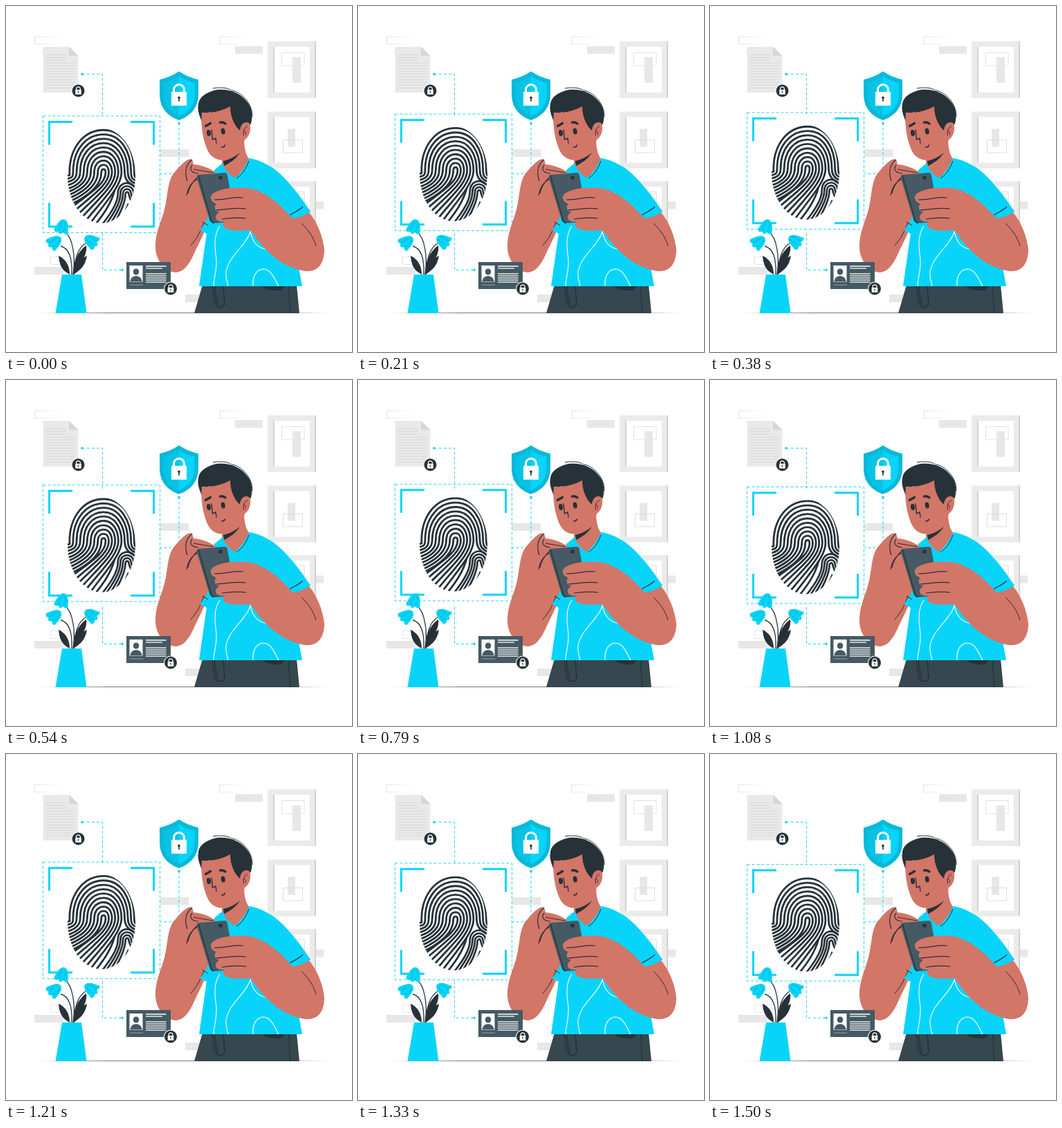
Recreate the animation shown at these times as an HTML page with a canvas. Size 500 by 500 pixels, loop 1.54 s.

```html
<!DOCTYPE html>
<html lang="en">
<head>
<meta charset="utf-8">
<title>Fingerprint access</title>
<style>
html, body { margin: 0; width: 100%; height: 100%; overflow: hidden; background: #fff; }
canvas { display: block; width: 100vw; height: 100vh; }
</style>
</head>
<body>
<canvas id="stage" width="500" height="500"></canvas>
<script>
const ctx = document.getElementById('stage').getContext('2d');
const CYAN = '#08d4fa', TEAL = '#08b9da', DARK = '#263238', SLATE = '#455a64';
const SKIN = '#d27668', PALE = '#ebebeb', GRAY = '#e7e7e7', WHITE = '#fff';

function fill(color, d) {
  ctx.fillStyle = color;
  ctx.fill(new Path2D(d));
}
function line(color, width, d, dash = []) {
  ctx.strokeStyle = color;
  ctx.lineWidth = width;
  ctx.setLineDash(dash);
  ctx.stroke(new Path2D(d));
  ctx.setLineDash([]);
}
function rect(color, x, y, w, h) {
  ctx.fillStyle = color;
  ctx.fillRect(x, y, w, h);
}
function oval(color, x, y, rx, ry = rx, turn = 0) {
  ctx.fillStyle = color;
  ctx.beginPath();
  ctx.ellipse(x, y, rx, ry, turn, 0, Math.PI * 2);
  ctx.fill();
}
function fade(x0, x1, ...stops) {
  const g = ctx.createLinearGradient(x0, 0, x1, 0);
  stops.forEach((c, i) => g.addColorStop(i / (stops.length - 1), c));
  return g;
}

function pictureFrame(y) {
  rect(PALE, 378, y, 70, 82);
  rect('#d2d2d2', 446, y, 2, 82);
  rect(WHITE, 387, y + 8, 52, 66);
  rect('#d2d2d2', 386, y + 8, 2, 66);
}

function background() {
  rect(WHITE, 0, 0, 500, 500);
  for (const x of [41.5, 308.5])
    line(fade(x, x + 40, '#e2e2e2', '#fff'), 1, `M${x} 44.5h41v10.5h-41z`);
  for (const [x, y, w] of [[331, 58, 40], [223, 207, 41], [41, 377, 42], [259, 417, 24], [446, 282.5, 13]])
    rect(GRAY, x, y, w, 11);
  line('#e6e6e6', 1, 'M64.5 362.5h25v11h-25z');

  [51, 152.5, 253].forEach(pictureFrame);
  line('#e2e2e2', 1, 'M398.5 67.5h32.5v18.5h-32.5z M402.5 268.5h29v22h-29z');
  rect(GRAY, 414, 74, 12, 37);
  rect(GRAY, 407, 177.5, 11, 26);
  line('#dcdcdc', 1, 'M400.5 193.5h28v18.5h-28z');

  line(fade(45, 467, '#fff', '#777', '#777', '#777', '#fff'), 1, 'M45 443.5H467');
}

function badge(x, y) {
  oval(WHITE, x, y, 10);
  oval(DARK, x, y, 9);
  rect(WHITE, x - 4.3, y - 1.5, 8.6, 6.8);
  line(WHITE, 1.3, `M${x - 2.9} ${y - 1}v-1.7a2.9 2.9 0 0 1 5.8 0v1.7`);
  rect(DARK, x - .6, y, 1.2, 3.2);
}

function documentSheet() {
  fill('#e9e9e9', 'M53.5 59H91L104.5 72V125H53.5z');
  fill('#d6d6d6', 'M91 59V72H104.5z');
  for (let i = 0; i < 13; i++)
    line('#d8d8d8', 1.2, `M58 ${70.5 + i * 4}H${i < 3 ? 87 : 100}`);
  badge(104.5, 122.5);
}

function idCard() {
  rect(SLATE, 174, 370, 64, 39);
  rect(WHITE, 178.5, 375, 19, 23.5);
  oval(SLATE, 188, 384, 4.3, 4.6);
  fill(SLATE, 'M179.5 398C180 387.5 196 387.5 196.5 398z');
  line(WHITE, 1.3, 'M202 376H231.5 M202 379.2H226');
  for (let y = 387; y < 400; y += 3) line(WHITE, 1.3, `M202 ${y}H231.5`);
  line('#90a4ae', 1, 'M179 403H198');
  badge(238, 408.5);
}

function shield() {
  fill(TEAL, 'M250 94.5C242 100 232 104 222 106.5V127C222 147 233 159 250 165C267 159 278 147 278 127V106.5C268 104 258 100 250 94.5z');
  fill('#08c3e6', 'M250 101C243 106 236 109 227.5 111V127C227.5 143 236 153 250 159z');
  fill(CYAN, 'M250 101C257 106 264 109 272.5 111V127C272.5 143 264 153 250 159z');
  rect(WHITE, 239, 124, 22, 20);
  line(WHITE, 3, 'M242.5 125V121A7.5 7.5 0 0 1 257.5 121V125');
  oval(DARK, 250, 132.5, 1.8);
  rect(DARK, 249.2, 133, 1.6, 5);
}

function links() {
  line(CYAN, .9, 'M110 98.5H139.5V158 M139.5 328V381.5H168 M250 169V242.5H223', [4, 3]);
  oval(CYAN, 110, 98.5, 1.8);
  oval(CYAN, 168, 381.3, 1.8);
  oval(CYAN, 250, 169.5, 1.8);
}

// Nested ridges: arches over one core, sweeping left, and splitting at a delta on the right.
function fingerprint() {
  ctx.save();
  ctx.beginPath();
  ctx.ellipse(138, 245.7, 49, 68.7, 0, 0, Math.PI * 2);
  ctx.clip();
  for (let k = 0; k < 10; k++) {
    const r = 4 + 6.3 * k, left = 141 - .81 * r, right = 141 + .73 * r, top = 240.5 - r;
    let d = `M84 ${291 - 5 * k}C${98 - k * .4} ${286 - 4.6 * k} ${left} ${268 - 2.4 * k} ${left} 241`
      + `C${left} ${240 - r * .6} ${141 - r * .45} ${top} 141 ${top}`
      + `S${right} ${240 - r * .55} ${right} 241`;
    if (k < 6) d += `C${right} 260 ${117 + 5.5 * k} ${273 + 2 * k} ${84 + 6.6 * k} ${300 + 4.2 * k}`;
    else d += `C${right} 250 ${right + 4} ${274 - 2.6 * k} 191 ${293 - 5 * k}`;
    line(DARK, 2.8, d);
  }
  line(DARK, 2.8, 'M157 267C152 286 141 302 126 320');
  for (let j = 0; j < 4; j++) {
    const r = 2.2 + 5.6 * j, x = 174 - r * .65;
    line(DARK, 2.7, `M${154 - 6 * j} 320C${163 - 4.5 * j} 303 ${x} 286 ${x} 272`
      + `C${x} ${272 - r * 1.1} ${174 + r * .7} ${271 - r} ${175 + r * .7} 270S${176 + r} 282 ${184 + r} 288`);
  }
  for (let j = 0; j < 2; j++)
    line(DARK, 2.7, `M${161 + 6 * j} 320Q${171 + 3 * j} 301 ${177 + 4 * j} ${286 + j}`);
  ctx.restore();
}

function scanner(lift) {
  ctx.save();
  ctx.translate(0, -lift);
  line(CYAN, .9, 'M53.5 159.5H222.5V328H53.5z', [4, 3]);
  line(CYAN, 3, 'M62.5 201V168H96 M180 168H213.5V201 M213.5 285V319.2H180 M96 319.2H62.5V285');
  fingerprint();
  ctx.restore();
}

function flower(x, y, turn) {
  ctx.save();
  ctx.translate(x, y);
  ctx.rotate(turn);
  fill(TEAL, 'M0-11C7-10 9-2 9 7L-8 8C-8-1-7-9 0-11z');
  fill(CYAN, 'M0-11C7-10 9-2 11 7C9 10 6 9 4 7C2 12-1 12-3 8C-6 11-9 10-10 7C-8-1-7-10 0-11z');
  line(TEAL, 1.2, 'M-1-8C-4-3-4 3-3 8 M2-8C5-3 5 3 4 7');
  ctx.restore();
}

function plant() {
  line(DARK, 1.3, 'M97 388C101 362 96 335 86 327 M95 388C96 365 91 350 79 347 M98 388C99 364 105 349 115 343');
  fill(DARK, 'M97 388C97 370 104 354 116 346C118 363 106 371 97 388z');
  fill(DARK, 'M97 388C101 374 109 364 117 361C115 374 108 382 97 388z');
  fill(DARK, 'M92 388C80 382 77 373 76 361C87 366 92 376 92 388z');
  flower(81, 319, .3);
  flower(70, 341, .95);
  flower(123, 340, -.95);
  fill(CYAN, 'M81 388H109L116.5 444H71.5z');
}

function trousers() {
  fill('#37474f', 'M284 403L272 444H424L420 403z');
  fill(DARK, 'M368 404C376 410 388 412 397 411L404 404z');
  line(DARK, 1.5, 'M298 405C301 415 299 427 304 433C308 437 315 436 316 430L314 405 M301 405C304 416 302 427 307 432');
  line(DARK, 1.2, 'M408.5 405L410.5 444');
}

function torso() {
  fill(SKIN, 'M312 222L344 191C344 207 347 217 353 223L331 250L312 238z');
  fill(CYAN, 'M313 227L301 237L300 300L281 323L290 328L279 405H428C425 384 419 367 421 340L412 308L440 297C426 276 407 250 387 235C373 226 361 221 351 220C344 236 336 246 329 248C321 242 315 235 313 227z');
  line(DARK, 1, 'M351 224C347 235 340 245 333 249');
  line(WHITE, 1.1, 'M309 318C299 332 302 352 304 366C305 383 300 393 300 405'
    + ' M353 327C345 349 323 359 318 384C317 393 320 399 321 405'
    + ' M353 322C354 339 363 351 379 352C400 354 396 371 424 374'
    + ' M357 405C356 391 361 381 372 380C383 380 389 396 394 405');
}

function head() {
  fill(DARK, 'M284 169C280 161 276 150 278 142C279 131 291 124 305 121C325 119 341 128 348 138C356 147 357 159 354 170L342 184L322 170L294 153z');
  line(DARK, 1, 'M299 119C314 116.5 325 119 328 125 M327 122C343 126 356 142 356 160');
  fill(SKIN, 'M283 154C300 155 313 151 324 145C324 160 330 173 338 180C339 170 345 166 351 169C356 174 352 190 345 193C342 207 333 216 321 221C305 226 294 218 289 203C284 189 281 170 283 154z');
  fill(DARK, 'M314 224C323 222 332 217 338 212C332 221 324 227 315 231z');
  line(DARK, 1, 'M349 174C343 176 342 184 344 188 M344 181C347 181 347 184 346 186');
  oval(DARK, 293, 183.5, 3, 4.6, -.15);
  oval(DARK, 313.7, 181, 3, 4.6, -.15);
  ctx.lineCap = 'round';
  line(DARK, 3.4, 'M288.5 173.5L295.5 169.5 M309.5 168.2C312 167.7 315 168.5 317 170');
  line(DARK, 1.4, 'M297 179L298.5 193L303 191L304 198 M311.5 204C314 204 316 203 316.5 201');
  ctx.lineCap = 'butt';
}

function farArm() {
  fill(SKIN, 'M269 222C263 218 253 229 242 242C233 254 234 274 229 294C224 313 215 329 216 350C217 369 231 385 246 385C260 383 267 369 274 353C282 337 290 321 293 306L283 259L293 244L304 241C297 236 285 230 271 229z');
  line(DARK, 1.2, 'M269 222C259 229 258 242 262 253 M269 230C264 236 268 241 278 242 M271 236L300 241 M279 250C270 251 263 262 261 274 M276 248C269 255 264 263 263 271');
  line(DARK, 1, 'M286 313C281 325 277 335 267 346');
  fill(CYAN, 'M292 304C289 312 285 318 280 324L290 329L299 314z');
  line(DARK, 1, 'M284 312L292 317');
}

function phone() {
  fill(SLATE, 'M278 244L314 241Q319 240 320 245L331 306Q332 312 327 312L300 314Q296 314 294 309L276 249Q275 245 278 244z');
  line(DARK, 1.2, 'M278 245L297 311Q298 313.5 301 313.5');
  oval(DARK, 310, 248, 2.8);
}

function nearArm() {
  fill(SKIN, 'M412 305L437 297C449 311 458 332 460 352C460 373 450 385 432 383C404 378 380 363 354 325C345 323 329 327 319 322C312 319 313 314 316 312C308 312 302 310 303 304C304 301 306 299 308 298C301 296 300 289 304 286C296 283 293 276 299 271C308 264 329 261 349 263C373 266 397 287 412 305z');
  line(DARK, 1.2, 'M301 280C319 280 329 275 343 277 M304 295C320 294 331 291 347 293 M312 308C324 306 334 305 347 307');
  line(DARK, 1, 'M427 314C436 323 444 333 448 347');
  fill(CYAN, 'M397 279L413 307C424 306 433 302 440 297L420 270z');
  line(DARK, 1.1, 'M410 302C418 298 424 295 429 290');
}

function person() {
  trousers();
  torso();
  head();
  farArm();
  phone();
  nearArm();
}

// Steady float: up 10 px and back in 1.5 s, stepped at 24 pictures a second on a 10 ms clock.
const LOOP = 1540, FPS = 24, PERIOD = 1.5, HEIGHT = 10;
function liftAt(ms) {
  const ticks = Math.floor((ms + 1) / 10);
  const step = Math.floor((ticks + .49) * FPS / 100);
  const phase = Math.min((step + 1) / FPS / PERIOD, 1);
  return HEIGHT * (1 - Math.abs(1 - 2 * phase));
}

const start = performance.now();
function draw() {
  background();
  documentSheet();
  links();
  shield();
  scanner(liftAt(Math.max(0, performance.now() - start) % LOOP));
  plant();
  person();
  idCard();
  requestAnimationFrame(draw);
}
draw();
</script>
</body>
</html>
```
